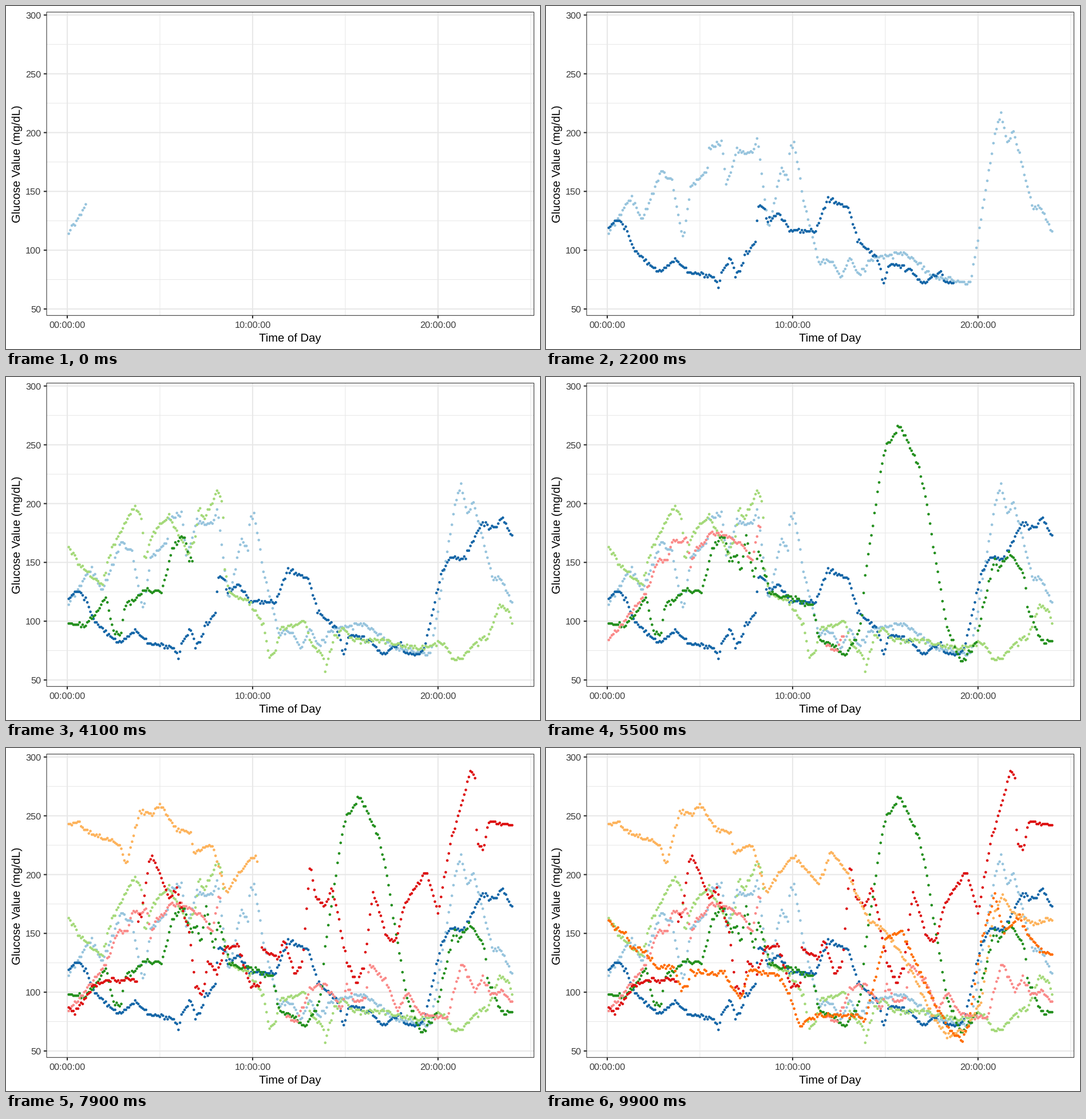
Animation of 933x600 px, one loop 10000 ms. Source, as a matplotlib script:

```python
import matplotlib.pyplot as plt
import numpy as np
from matplotlib.animation import FuncAnimation
from matplotlib.patches import Rectangle

plt.rcParams.update({"text.hinting": "none", "text.kerning_factor": 0,
                     "font.family": "Liberation Sans"})

W, H, DPI = 933, 600, 64
PT = 72 / DPI  # points per pixel
FRAMES, STEP_MS = 100, 100
FIRST, RATE = 12, 22.75  # readings at the start, then added per frame
GAP_DAY, GAP = 4, (8.3, 11.8)  # hours without readings

# Colour and main turning points (hour, mg/dL) of each day
DAYS = [
    ("#97c4dd", [
        (0, 113), (1.3, 145), (1.9, 126), (2.9, 167), (3.5, 159), (4.1, 108),
        (4.5, 154), (5.4, 167), (5.5, 187), (6.2, 191), (6.4, 156),
        (7, 184), (7.9, 184), (8.1, 196), (8.7, 117), (9.4, 170), (9.75, 160),
        (9.85, 188), (10.1, 190), (10.6, 140), (11.4, 91), (12.2, 90),
        (12.6, 76), (13.1, 94), (13.6, 78), (14.2, 92), (16, 98), (17.8, 76),
        (19.6, 72), (20.9, 197), (21.25, 216), (21.6, 189), (21.9, 202),
        (23, 134), (23.3, 138), (24, 116)]),
    ("#1466a7", [
        (0, 119), (0.7, 125), (1.1, 116), (1.4, 101), (2.8, 81), (3.7, 92),
        (4.5, 80), (5.8, 77), (6, 68), (6.2, 83), (6.7, 93), (6.9, 80),
        (7.2, 83), (7.4, 96), (8, 107), (8.15, 139), (8.5, 138), (8.6, 124),
        (9.3, 132), (9.8, 117), (11.2, 116), (11.9, 143), (13, 137),
        (13.5, 110), (14.6, 92), (14.9, 71), (15.2, 88), (16.3, 84),
        (17, 72), (18, 82), (18.2, 72), (19.2, 72), (20.2, 142), (20.7, 155),
        (21.4, 153), (22.4, 184), (23, 178), (23.5, 188), (24, 171)]),
    ("#a4d979", [
        (0, 165), (0.8, 145), (1.9, 131), (2.4, 161), (3.6, 198), (4, 188),
        (4.2, 150), (4.6, 175), (5.5, 190), (6.5, 158), (6.9, 168), (7.1, 197),
        (7.4, 186), (8.1, 212), (8.4, 200), (8.5, 144), (8.8, 122), (9.7, 118),
        (10.6, 98), (10.9, 68), (11.2, 72), (11.5, 93), (12.8, 100),
        (13.2, 79), (13.8, 72), (13.9, 56), (14.4, 87), (14.9, 94),
        (15.4, 84), (17, 83), (19, 77), (20.3, 82), (20.8, 67), (21.3, 68),
        (21.9, 80), (22.7, 86), (23.3, 113), (23.8, 110), (24, 98)]),
    ("#24901e", [
        (0, 98), (1, 97), (1.7, 110), (2.1, 121), (2.5, 92), (2.9, 89),
        (3.1, 112), (4.2, 126), (5.1, 125), (5.7, 163), (6.3, 173), (6.6, 151),
        (7, 157), (7.2, 141), (7.5, 173), (7.9, 137), (8.2, 160), (8.8, 123),
        (9.9, 120), (11.1, 113), (11.4, 86), (12.9, 71), (13.7, 96),
        (13.9, 138), (14.8, 232), (15.1, 250), (15.8, 266), (16.8, 232),
        (17.2, 203), (18.3, 96), (19.1, 65), (19.8, 79), (20.9, 153),
        (21.1, 143), (21.7, 158), (22.5, 139), (22.7, 108), (23.4, 84),
        (24, 83)]),
    ("#fa8a89", [
        (0, 83), (1.4, 109), (2.1, 124), (2.8, 154), (3.2, 150), (3.5, 168),
        (4.3, 170), (4.5, 149), (4.8, 160), (5.6, 175), (6.2, 175),
        (7.3, 164), (7.8, 150), (8.2, 182), (11.5, 93), (11.8, 78),
        (12.4, 76), (12.7, 86), (13.1, 103), (13.9, 106), (14.8, 86),
        (15.1, 107), (15.5, 92), (16.1, 95), (16.3, 124), (17.2, 109),
        (17.8, 84), (18.4, 100), (19, 82), (20.5, 78), (21.3, 126),
        (22, 101), (22.4, 113), (22.8, 99), (23.5, 100), (24, 91)]),
    ("#dd1011", [
        (0, 88), (0.4, 83), (0.9, 92), (1.4, 105), (2.2, 110), (3.75, 110),
        (3.85, 170), (4, 165), (4.4, 209), (4.6, 216), (5.5, 180), (5.9, 188),
        (6.6, 150), (6.9, 105), (7.3, 96), (7.6, 127), (8.1, 115), (8.5, 137),
        (9.2, 140), (9.9, 105), (10.4, 104), (10.5, 136), (11.4, 130),
        (11.7, 145), (12.3, 114), (12.7, 126), (13.1, 208), (13.4, 181),
        (13.9, 172), (14.3, 190), (15.1, 125), (15.6, 107), (16, 122),
        (16.5, 185), (17.3, 145), (17.7, 142), (18.2, 175), (19.4, 202),
        (20, 167), (20.7, 228), (21.8, 290), (22, 283), (22.1, 229),
        (22.4, 220), (22.8, 246), (24, 241)]),
    ("#fdb35c", [
        (0, 242), (0.6, 244), (1.2, 235), (2.8, 226), (3.2, 208), (3.9, 254),
        (4.6, 251), (5, 261), (5.8, 239), (6.7, 235), (6.8, 218), (7.8, 226),
        (8.6, 184), (9.2, 200), (10.1, 216), (11.4, 192), (12.1, 219),
        (13, 201), (14.1, 161), (15, 152), (16.3, 122), (17.5, 81),
        (18.3, 63), (19.3, 67), (20.2, 94), (20.8, 163), (21.3, 182),
        (21.9, 167), (23.2, 158), (23.7, 163), (24, 161)]),
    ("#ff6d00", [
        (0, 161), (1.1, 147), (1.3, 138), (2, 135), (2.7, 121), (3.6, 122),
        (4, 103), (4.3, 104), (4.5, 117), (5.8, 116), (6.3, 118), (6.6, 108),
        (7.2, 95), (7.7, 119), (9.3, 114), (9.8, 99), (10.4, 71),
        (11.3, 80), (13.5, 81), (13.9, 75), (15, 146), (15.9, 151),
        (17.3, 102), (18.4, 69), (19.1, 59), (19.5, 72), (20.2, 144),
        (20.9, 183), (21.4, 150), (22.2, 165), (22.7, 149), (23.5, 134),
        (24, 132)]),
]


def px(hour):
    return 107 + 32.39 * hour


def py(value):
    return 530 - 2.057 * (value - 50)


def readings():
    """Dots of all days in order of time, with their colours."""
    rng = np.random.default_rng(4)
    spots, shades = [], []
    for day, (color, turns) in enumerate(DAYS):
        hours = np.arange(1, 289) / 12
        if day == GAP_DAY:
            hours = hours[(hours < GAP[0]) | (hours > GAP[1])]
        wobble = rng.normal(0, 1.1, len(hours))
        values = np.round(np.interp(hours, *zip(*turns)) + wobble)
        spots.append(np.column_stack([px(hours), py(values)]))
        shades += [color] * len(hours)
    return np.concatenate(spots), shades


fig = plt.figure(figsize=(W / DPI, H / DPI), dpi=DPI, facecolor="white")
ax = fig.add_axes([0, 0, 1, 1])
ax.set_xlim(0, W)
ax.set_ylim(H, 0)
ax.axis("off")

LEFT, RIGHT, TOP, BOTTOM = 71, 922.4, 10.7, 541.3
INK, GREY, GRID = "#242424", "#3b3b3b", "#e7e7e7"


def line(x, y, width, color=GRID, z=1):
    ax.plot(x, y, color=color, lw=width * PT, zorder=z,
            solid_capstyle="butt", snap=False)


def label(x, y, text, size, color, **kw):
    ax.text(x, y, text, fontsize=size * PT, color=color, va="baseline", **kw)


for h in (5, 15, 25):
    line([px(h)] * 2, [TOP, BOTTOM], 1)
for v in range(75, 300, 50):
    line([LEFT, RIGHT], [py(v)] * 2, 1)
for h in (0, 10, 20):
    line([px(h)] * 2, [TOP, BOTTOM], 2)
    line([px(h)] * 2, [BOTTOM, BOTTOM + 5.1], 2, INK, 4)
    label(px(h), 563, f"{h:02d}:00:00", 16.3, GREY, ha="center")
for v in range(50, 301, 50):
    line([LEFT, RIGHT], [py(v)] * 2, 2)
    line([LEFT - 5.1, LEFT], [py(v)] * 2, 2, INK, 4)
    label(61.3, py(v) + 5.9, str(v), 16.3, GREY, ha="right")
ax.add_patch(Rectangle((LEFT, TOP), RIGHT - LEFT, BOTTOM - TOP, fill=False,
                       ec=INK, lw=PT, zorder=5, snap=False))
label(496.5, 586.5, "Time of Day", 20.3, "black", ha="center")
label(25, 276.5, "Glucose Value (mg/dL)", 20.3, "black", ha="center",
      rotation=90, rotation_mode="anchor")

spots, shades = readings()
dots = ax.scatter(spots[:, 0], spots[:, 1], s=(4.6 * PT) ** 2, c=shades,
                  linewidths=0, zorder=3, snap=False)


def update(frame):
    dots.set_offsets(spots[:FIRST + round(RATE * frame)])
    return (dots,)


anim = FuncAnimation(fig, update, frames=FRAMES, interval=STEP_MS,
                     repeat=True, repeat_delay=0)
plt.show()
```
